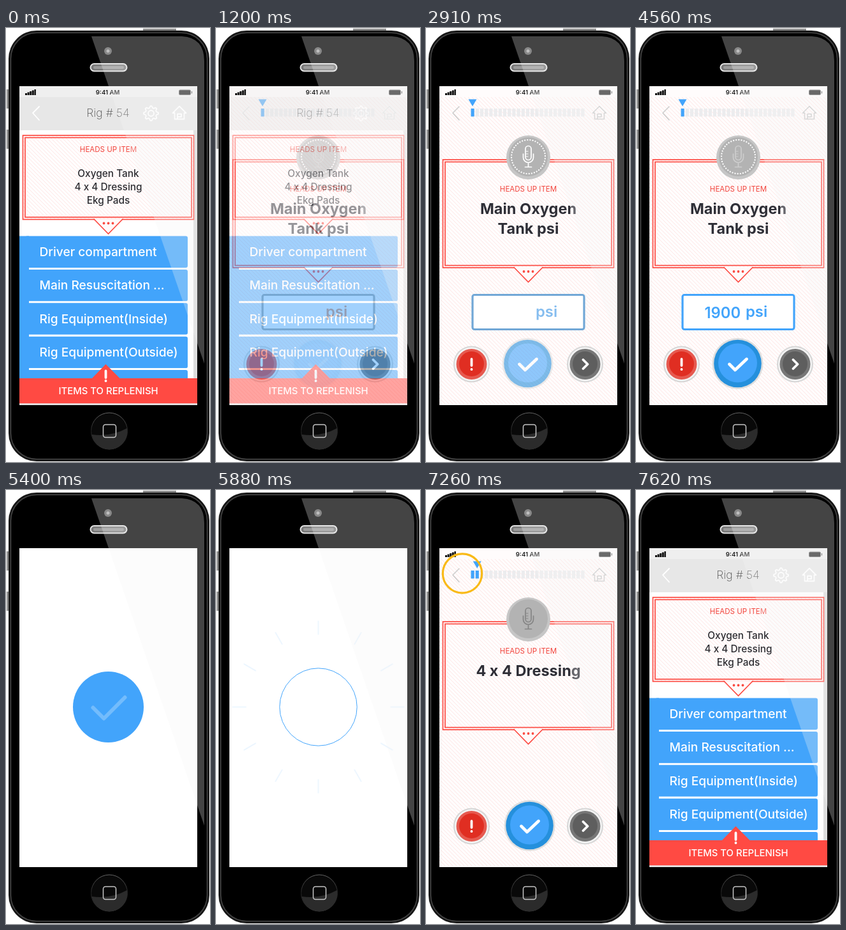
These frames come from a looping animation (320 px wide and 679 px high, 8.31 s). An HTML page:

```html
<!DOCTYPE html>
<html lang="en">
<head>
<meta charset="utf-8">
<title>Rig checklist</title>
<style>
  html, body { margin: 0; width: 100%; height: 100%; overflow: hidden; background: #fff; }
  svg { display: block; width: 100%; height: 100%; }
  text { font-family: Inter, Roboto, sans-serif; }
  .mid { text-anchor: middle; }
  .red { fill: #fb4b42; }
  .head { font-size: 11.5px; fill: #f2453d; }
  .item { font-size: 15.4px; font-weight: 500; fill: #2d2d32; }
  .row { font-size: 19.2px; font-weight: 500; fill: #fff; }
  .title { font-size: 23.5px; font-weight: 700; fill: #2f2f37; }
  .value { font-size: 23.8px; font-weight: 600; }
  .line { fill: none; stroke-linecap: round; stroke-linejoin: round; }
</style>
</head>
<body>
<svg viewBox="0 0 320 679">
  <defs>
    <pattern id="stripes" width="6" height="6" patternUnits="userSpaceOnUse">
      <path d="M-1-1L7 7M-1 5L1 7M5-1L7 1" stroke="#fde6e5"/>
    </pattern>
    <linearGradient id="rim" x2="0" y2="1">
      <stop stop-color="#666"/><stop offset=".5" stop-color="#222"/><stop offset="1" stop-color="#444"/>
    </linearGradient>
    <clipPath id="screenClip"><rect x="21" y="91" width="279" height="499"/></clipPath>
    <g id="status">
      <path d="M30 102h3v3h-3zM33.6 100.500h3v4.500h-3zM37.200 99h3v6h-3zM40.800 97.500h3v7.500h-3zM44.400 96h2.500v9h-2.500z" fill="#111"/>
      <text class="mid" x="159.500" y="104" font-size="9.600" font-weight="600" fill="#222">9:41 AM</text>
      <rect x="271.500" y="97" width="18" height="7.500" rx="1.500" fill="#333" stroke="#777"/>
      <path d="M291.500 99v3.500" stroke="#555"/>
    </g>
    <path id="back" class="line" d="M52 123L42 133L52 144"/>
    <path id="house" class="line" d="M261.500 133L272 122.500L282.500 133H279.500V142.500H264.500V133ZM269 142V134.500H275V139H269"/>
  </defs>

  <!-- phone body -->
  <path d="M215 4V1H267V4ZM1 96H5V126H1ZM1 159H5V189H1Z" fill="#8f8f8f"/>
  <rect x="4" y="4" width="315" height="674" rx="44" fill="#161616"/>
  <rect x="7.500" y="7.500" width="308" height="667" rx="40.500" stroke="#454545" stroke-width="1.500"/>
  <circle cx="160" cy="36" r="6" fill="#606060"/><circle cx="160" cy="36" r="2.500" fill="#aaa"/>
  <rect x="132.500" y="56" width="57" height="11.500" rx="5.750" fill="#777" stroke="#e3e3e3" stroke-width="2"/>
  <rect x="137" y="59.500" width="48" height="4.500" rx="2.250" fill="#999"/>
  <circle cx="162" cy="630.500" r="28.500" fill="#090909" stroke="url(#rim)"/>
  <path d="M134.500 636Q165 640 190 626A28 28 0 0 1 134.500 636Z" fill="#2b2b2b"/>
  <rect x="152.500" y="620.500" width="20" height="20" rx="3.500" fill="none" stroke="#c6c6c6" stroke-width="1.500"/>

  <g clip-path="url(#screenClip)">
    <rect x="20" y="91" width="281" height="499" fill="#fff"/>

    <g id="home">
      <rect x="20" y="91" width="281" height="499" fill="#fff"/>
      <path d="M294 160H300V548H294Z" fill="#dedede"/>
      <rect x="20" y="91" width="281" height="69" fill="#e7e7e7"/>
      <rect x="20" y="91" width="281" height="17" fill="#efefef"/>
      <use href="#status"/>
      <g stroke="#fff" stroke-width="1.800" fill="none">
        <use href="#back"/><use href="#house"/>
        <path id="gear" class="line"/><circle cx="227.500" cy="133.500" r="4.500"/>
      </g>
      <text class="mid" x="160" y="139" font-size="17.700" font-weight="200" fill="#555">Rig # 54</text>
      <g id="homeCard"></g>
      <text class="head mid" x="160.500" y="193.500">HEADS UP ITEM</text>
      <text class="item mid" x="160.500" y="233">Oxygen Tank</text>
      <text class="item mid" x="160.500" y="254">4 x 4 Dressing</text>
      <text class="item mid" x="160.500" y="275">Ekg Pads</text>
      <g id="rows"></g>
      <path d="M20 548H135L156.500 526L178.500 548H301V587.500H20Z" fill="#ff4a43"/>
      <rect x="20" y="587.500" width="281" height="3" fill="#e4e4e4"/>
      <path d="M156.500 536.500V547M156.500 552V552.200" class="line" stroke="#fff" stroke-width="3.800"/>
      <text class="mid" x="160.500" y="572.500" font-size="14.900" font-weight="500" fill="#fff">ITEMS TO REPLENISH</text>
    </g>

    <g id="question">
      <rect x="20" y="91" width="281" height="499" fill="#fffcfc"/>
      <rect x="20" y="108" width="281" height="480" fill="url(#stripes)"/>
      <use href="#status"/>
      <g stroke="#cbcbcb" stroke-width="1.500" fill="none"><use href="#back"/><use href="#house"/></g>
      <g id="bars"></g>
      <path id="pointer" d="M-6.500 111.500H6.500L0 122.500Z" fill="#42a4fb"/>
      <g id="questionCard"></g>
      <circle cx="160.500" cy="202.500" r="34.500" fill="#c6c6c6"/>
      <circle cx="160.500" cy="201.500" r="30.500" fill="#b3b3b3"/>
      <g id="dots" fill="#fff"></g>
      <g id="mic" class="line" stroke-width="1.700">
        <rect x="156" y="184.500" width="9" height="22" rx="4.500"/>
        <path d="M152.500 197V202.500A8 8 0 0 0 168.500 202.500V197M160.500 211V217M155.500 217.500H165.500"/>
        <path d="M157 193H160M157 197H160M157 201H160" stroke-width="1"/>
      </g>
      <text class="head mid" x="160.500" y="256">HEADS UP ITEM</text>
      <g id="first">
        <text class="title mid" x="160.500" y="290.500">Main Oxygen</text>
        <text class="title mid" x="160.500" y="322">Tank psi</text>
        <rect id="field" x="73" y="417.500" width="175" height="54" rx="3" fill="#fff" stroke-width="3.200"/>
        <text id="unit" class="value" x="172" y="451.500">psi</text>
        <text id="amount" class="value" x="107.500" y="454" fill="#42a4fb">1900</text>
      </g>
      <text id="second" class="title mid" x="160.500" y="290.500">4 x 4 Dressing</text>
      <g id="buttons"></g>
      <g id="confirm">
        <circle r="40" fill="#dedede"/><circle r="37.300" fill="#2590dc"/>
        <circle cy="-1" r="30.500" fill="#42a4fb"/>
        <path class="line" d="M-13 1L-4 10L14 -7" stroke="#fff" stroke-width="4.800"/>
      </g>
    </g>

    <g id="success" transform="translate(160.500 339.500)">
      <g id="rays" stroke="#42a4fb"></g>
      <circle id="disc" fill="#42a4fb"/>
      <path id="tick" class="line" d="M-24 1L-7 18L26 -15" stroke="#fff" stroke-width="6"/>
      <circle id="outline" r="60.700" fill="none" stroke="#42a4fb"/>
    </g>
    <circle id="tap" fill="none" stroke="#f9ba17" stroke-width="3.200"/>
  </g>

  <path d="M134 13H276Q311 15 311 52V525Z" fill="#f5f5f5" opacity=".28"/>
</svg>
<script>
const LOOP = 8310;
const $ = id => document.getElementById(id);
const set = (id, attrs) => {
  for (const name in attrs) $(id).setAttribute(name, attrs[name]);
};
const repeat = (count, make) => Array.from({ length: count }, (_, i) => make(i)).join('');
const ramp = (t, from, to) => Math.min(1, Math.max(0, (t - from) / (to - from)));
const easeOut = p => 1 - (1 - p) ** 3;
const blend = (a, b, p) => a.map((v, i) => Math.round(v + (b[i] - v) * p));
const mix = (a, b, p) => `rgb(${blend(a, b, p)})`;
const BLUE = [66, 164, 251], TAN = [225, 150, 110], PALE = [215, 220, 225];

function card(top, bottom) {
  const frame = 'stroke="#fd4a42" stroke-width="1.700"';
  return `<rect x="26.500" y="${top}" width="268" height="${bottom - top}" fill="#fffdfd"/>
    <rect x="26.500" y="${top}" width="268" height="${bottom - top}" fill="url(#stripes)" ${frame}/>
    <rect x="30" y="${top + 3.5}" width="261" height="${bottom - top - 7}" fill="none" ${frame}/>
    <path d="M137.500 ${bottom - 1}L160.500 ${bottom + 22.5}L183.500 ${bottom - 1}" fill="#fffafa" ${frame}/>
    ${repeat(3, i => `<circle class="red" cx="${153.5 + 7 * i}" cy="${bottom + 6}" r="1.900"/>`)}`;
}

function sideButton(x, rim, face, icon) {
  return `<g transform="translate(${x} 526)">
    <circle r="28.500" fill="#d6d6d6"/><circle r="26.500" fill="#f4f4f4"/>
    <circle r="24" fill="${rim}"/><circle cy="-.5" r="19.500" fill="${face}"/>
    <path class="line" d="${icon}" stroke="#fff" stroke-width="3.800"/></g>`;
}

function build() {
  $('homeCard').innerHTML = card(168, 299.5);
  $('questionCard').innerHTML = card(206, 375);
  const labels = ['Driver compartment', 'Main Resuscitation ...', 'Rig Equipment(Inside)', 'Rig Equipment(Outside)', ''];
  $('rows').innerHTML = '<path d="M20 325.500H36V548H20Z" fill="#42a4fb"/>' + labels.map((label, i) => {
    const y = 325.5 + 52.4 * i;
    return `<rect x="30" y="${y}" width="255" height="49.500" rx="3" fill="#42a4fb"/>
      <path d="M36 ${y + 49.5}H285V${y + 52.4}H36Z" fill="#fff"/>
      <text class="row" x="52.500" y="${y + 31.5}">${label}</text>`;
  }).join('');
  $('bars').innerHTML = repeat(25, i => `<rect x="${70.5 + 7.2 * i}" y="126" width="5.200" height="12.500"/>`);
  $('dots').innerHTML = repeat(40, i => `<circle cx="160.500" cy="175" r="1.150" transform="rotate(${9 * i} 160.500 201.500)"/>`);
  $('rays').innerHTML = repeat(12, i => `<line transform="rotate(${30 * i})"/>`);
  $('buttons').innerHTML =
    sideButton(71.5, '#e65a50', '#e02e22', 'M0-8V2M0 8V8.200') +
    sideButton(249.5, '#777', '#5e5e5e', 'M-3-7L4 0L-3 7');
  const gear = Array.from({ length: 32 }, (_, i) => {
    const angle = (i - 0.5) * Math.PI / 16, r = i % 4 < 2 ? 11.5 : 8.7;
    return `${(227.5 + r * Math.cos(angle)).toFixed(2)} ${(133.5 + r * Math.sin(angle)).toFixed(2)}`;
  });
  $('gear').setAttribute('d', `M${gear.join('L')}Z`);
}

function drawQuestion(t) {
  const isSecond = t >= 6200;
  const opacity = ramp(t, 960, 1440) - ramp(t, 5040, 5340) + ramp(t, 6300, 6600) - ramp(t, 7320, 7620);
  const enabled = isSecond ? 1 : ramp(t, 2730, 3060);
  const done = isSecond ? 2 : 1;
  set('question', { opacity });
  set('first', { display: isSecond ? 'none' : 'inline' });
  set('second', { display: isSecond ? 'inline' : 'none' });
  set('pointer', { transform: `translate(${73 + 7.2 * (done - 1)} 0)` });
  [...$('bars').children].forEach((bar, i) => bar.setAttribute('fill', i < done ? '#42a4fb' : '#ececee'));
  const pulse = isSecond ? 0 : 0.5 + 0.5 * Math.cos((t - 2910) / 1320 * 2 * Math.PI);
  set('mic', { stroke: isSecond ? '#858585' : mix([155, 155, 155], [255, 255, 255], pulse) });
  set('dots', { display: isSecond ? 'none' : 'inline', transform: `rotate(${t * 0.03} 160.500 201.500)` });
  set('field', { stroke: mix([170, 170, 170], BLUE, enabled) });
  set('unit', { fill: mix(blend(TAN, PALE, ramp(t, 2220, 2730)), BLUE, enabled) });
  set('amount', { opacity: ramp(t, 3090, 3420) });
  set('confirm', {
    opacity: 0.1 + 0.9 * enabled,
    transform: `translate(${isSecond ? 162.5 : 159.5} 525)`
  });
}

function drawSuccess(t) {
  const grow = easeOut(ramp(t, 5250, 5520));
  const clear = ramp(t, 5610, 5850);
  set('success', { display: t > 5250 && t < 6120 ? 'inline' : 'none' });
  set('disc', { r: 60.7 * grow, opacity: 1 - clear });
  set('tick', { opacity: ramp(t, 5370, 5490) * (1 - clear) });
  set('outline', {
    opacity: ramp(t, 5490, 5550) * (1 - ramp(t, 5940, 6120)),
    'stroke-width': 1 + 2 * (1 - clear)
  });
  const burst = easeOut(ramp(t, 5490, 5880));
  for (const ray of $('rays').children) {
    ray.setAttribute('y1', -65 - 48 * burst);
    ray.setAttribute('y2', -67 - 68 * burst);
  }
  set('rays', { opacity: ramp(t, 5490, 5550) * (1 - ramp(t, 5640, 5935)) });
}

const taps = [[540, 960, 161, 306], [4740, 5040, 159.5, 524], [7050, 7320, 57, 130.5]];

function drawTap(t) {
  const tap = taps.find(([start, end]) => t >= start && t < end + 150);
  set('tap', { display: tap ? 'inline' : 'none' });
  if (!tap) return;
  const [start, end, cx, cy] = tap;
  const appear = easeOut(ramp(t, start, start + 180));
  set('tap', { cx, cy, r: 22 + 8.7 * appear, opacity: appear * (1 - ramp(t, end, end + 150)) });
}

function draw(t) {
  set('home', { display: t < 1440 || t >= 7050 ? 'inline' : 'none' });
  drawQuestion(t);
  drawSuccess(t);
  drawTap(t);
}

build();
const began = performance.now();
function tick() {
  draw((performance.now() - began) % LOOP);
  requestAnimationFrame(tick);
}
tick();
</script>
</body>
</html>
```
